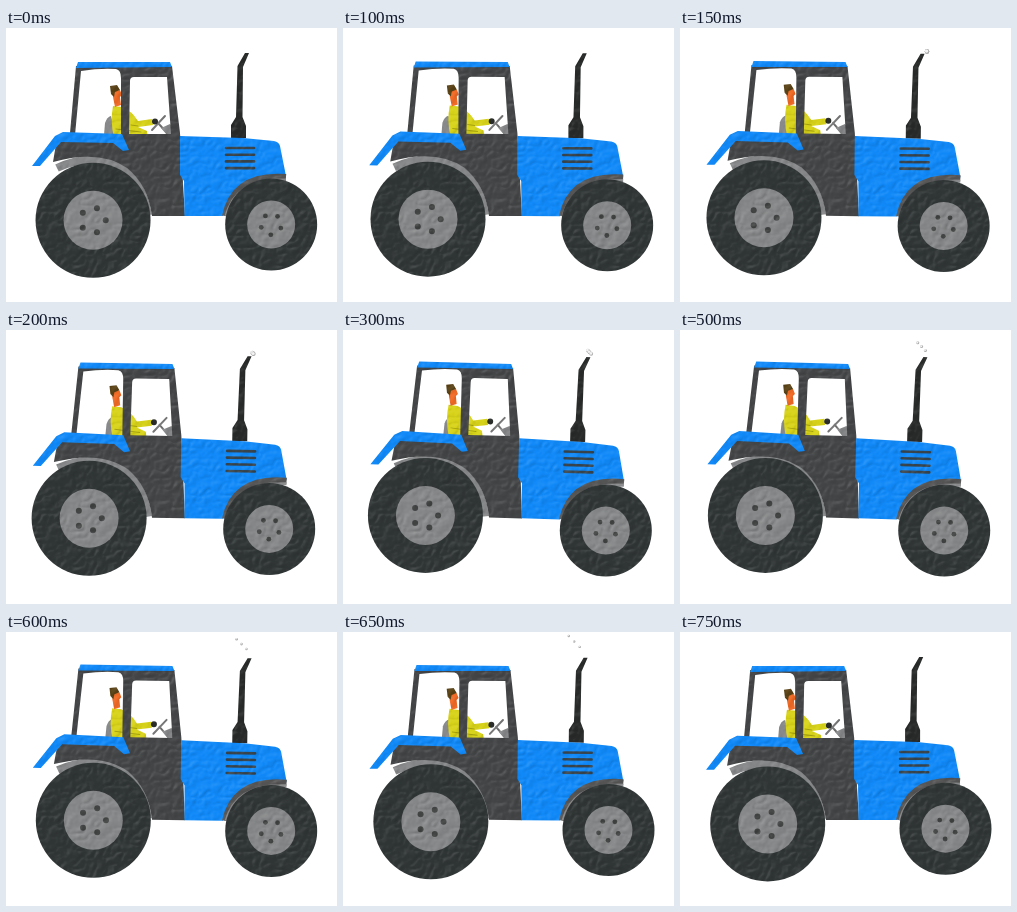
An HTML page with a canvas that plays this animation: 331x274 px, repeating every 0.8 s.

```html
<!DOCTYPE html>
<html lang="en">
<head>
<meta charset="utf-8">
<title>Tractor</title>
<style>
html, body { margin: 0; width: 100%; height: 100%; overflow: hidden; background: #fff; }
canvas { display: block; }
</style>
</head>
<body>
<canvas id="stage" width="331" height="274"></canvas>
<script>
const W = 331, H = 274, LOOP = 800, STEP = 50, TAU = Math.PI * 2;
const ctx = document.getElementById('stage').getContext('2d');
const BLUE = '#1089f8', DARK = '#434546', TYRE = '#303536', GREY = '#868788', YELLOW = '#d8d319';

function shape(path, fill) {
  ctx.fillStyle = fill;
  ctx.fill(new Path2D(path), 'evenodd');
}

function line(path, color, width, cap = 'round') {
  ctx.strokeStyle = color;
  ctx.lineWidth = width;
  ctx.lineCap = cap;
  ctx.stroke(new Path2D(path));
}

function disc(x, y, r, fill) {
  ctx.fillStyle = fill;
  ctx.beginPath();
  ctx.arc(x, y, r, 0, TAU);
  ctx.fill();
}

// Crumpled clay relief: the slope of smooth value noise becomes light and shade.
function makeRelief() {
  const tile = document.createElement('canvas');
  tile.width = W;
  tile.height = H;
  const c = tile.getContext('2d'), image = c.createImageData(W, H);
  const hash = (x, y) => {
    const s = Math.sin(x * 127.1 + y * 311.7) * 43758.5453;
    return s - Math.floor(s);
  };
  const noise = (x, y) => {
    const i = Math.floor(x), j = Math.floor(y);
    const u = (x - i) ** 2 * (3 - 2 * (x - i)), v = (y - j) ** 2 * (3 - 2 * (y - j));
    const a = hash(i, j), b = hash(i + 1, j), d = hash(i, j + 1), e = hash(i + 1, j + 1);
    return a + (b - a) * u + (d - a) * v + (a - b - d + e) * u * v;
  };
  const height = (x, y) =>
    Math.abs(noise(x / 7 + y / 16, y / 6) - 0.5) + 0.3 * noise(x / 3 + 40, y / 3);
  for (let y = 0, k = 0; y < H; y++) {
    for (let x = 0; x < W; x++, k += 4) {
      const slope = height(x + 1, y + 1) - height(x - 1, y - 1);
      image.data.fill(slope > 0 ? 255 : 0, k, k + 3);
      image.data[k + 3] = Math.min(32, Math.abs(slope) * 55);
    }
  }
  c.putImageData(image, 0, 0);
  return tile;
}
const relief = makeRelief();

function drawDriver(sway) {
  shape('M98 107L99 95Q101 89 105 88L110 107Z', GREY);
  line('M146 102L159 88M152 95L162 106', '#777', 2);
  shape('M155 100L164 96L173 107H161Z', GREY);

  ctx.save();
  ctx.translate(-2.6 * sway, -0.9 * sway);
  shape('M107 78L116 79Q126 83 132 93L146 91L147 97L132 99L141 103L142 110H108Q104 93 107 78Z', YELLOW);
  line('M125 97L132 98M110 101L135 104', '#a6a20e', 1);
  shape('M108 63L114 62L116 67L114 69L115 77L109 79L107 69Z', '#f06a25');
  shape('M104 58L111 57L114 62L109 64L108 69L105 66Z', '#584014');
  disc(149, 93.5, 3, '#292c29');
  ctx.restore();
}

function drawBody(sway) {
  drawDriver(sway);

  // Rear mudguard lining and cab
  line('M51 140Q76 128 102 134Q136 146 142 187', GREY, 8, 'butt');
  shape('M70 38H166L174 105L179 188H146Q142 157 121 140Q94 121 47 134L50 116L64 105Z' +
    'M75 43Q94 40 110 41Q115 42 115 50V107H69Z' +
    'M124 53Q124 49 128 49H161L165 106H123Z', DARK);
  shape('M72 34H164L166 39L70 40Z', BLUE);
  shape('M26 138L49 108L57 104L116 106L123 122L117 123L107 115L55 114L34 138Z', BLUE);

  // Exhaust pipe and bonnet
  shape('M225 110V97L230 89L231.5 38L239 25L243 25L237 39L236.5 89L240 98V110Z', '#282a2a');
  shape('M174 108L237 110L268 113Q273 114 274 118L280 148Q235 146 217 188H178.5L178 153L174 147Z', BLUE);
  line('M219 188Q228 145 280 149', '#555', 6, 'butt');
  line('M220 188Q230 150 280 152', GREY, 3, 'butt');
  for (let y = 120; y < 142; y += 6.7) line(`M220 ${y}H248`, '#38444c', 2.6);
}

function drawWheel(x, y, tyre, hub, bolt, angle) {
  disc(x, y, tyre, TYRE);
  disc(x, y, hub, GREY);
  for (let i = 0; i < 5; i++) {
    const a = angle + i * TAU / 5;
    disc(x + hub * 0.43 * Math.cos(a), y + hub * 0.43 * Math.sin(a), bolt, '#414343');
  }
}

function drawSmoke(time) {
  if (time < 150 || time > 700) return;
  const p = (time - 150) / 550;
  const x = 247 - 21 * p ** 3, y = 23.5 - 17 * p * p;
  for (let i = -1; i <= 1; i++) {
    const px = x + i * 6 * p, py = y + i * 6 * p;
    disc(px, py, 2.2 - 1.1 * p, '#aaa');
    disc(px - 0.4, py - 0.4, 1.7 - 1.1 * p, '#f4f4f4');
  }
}

function render(time) {
  const phase = time / LOOP * TAU;
  const sway = 1 - Math.cos(phase);
  ctx.clearRect(0, 0, W, H);
  ctx.save();
  ctx.translate(165, 188);
  ctx.rotate(0.016 * sway);
  ctx.translate(-165, -188);
  drawBody(sway);
  ctx.restore();

  drawWheel(85.2 + 2.8 * Math.cos(phase + 0.85), 188.3 + 4 * Math.cos(phase), 57.5, 29.5, 3, 0);
  drawWheel(264.2 + 1.4 * Math.cos(phase + 0.8), 198.9 - 2.4 * Math.cos(phase), 46, 24, 2.4, 0.35);

  ctx.globalCompositeOperation = 'source-atop';
  ctx.drawImage(relief, 0, 0);
  ctx.globalCompositeOperation = 'source-over';
  drawSmoke(time);
}

const start = performance.now();
function tick() {
  const time = (performance.now() - start) % LOOP;
  render(Math.floor(time / STEP) * STEP);
  requestAnimationFrame(tick);
}
tick();
</script>
</body>
</html>
```
